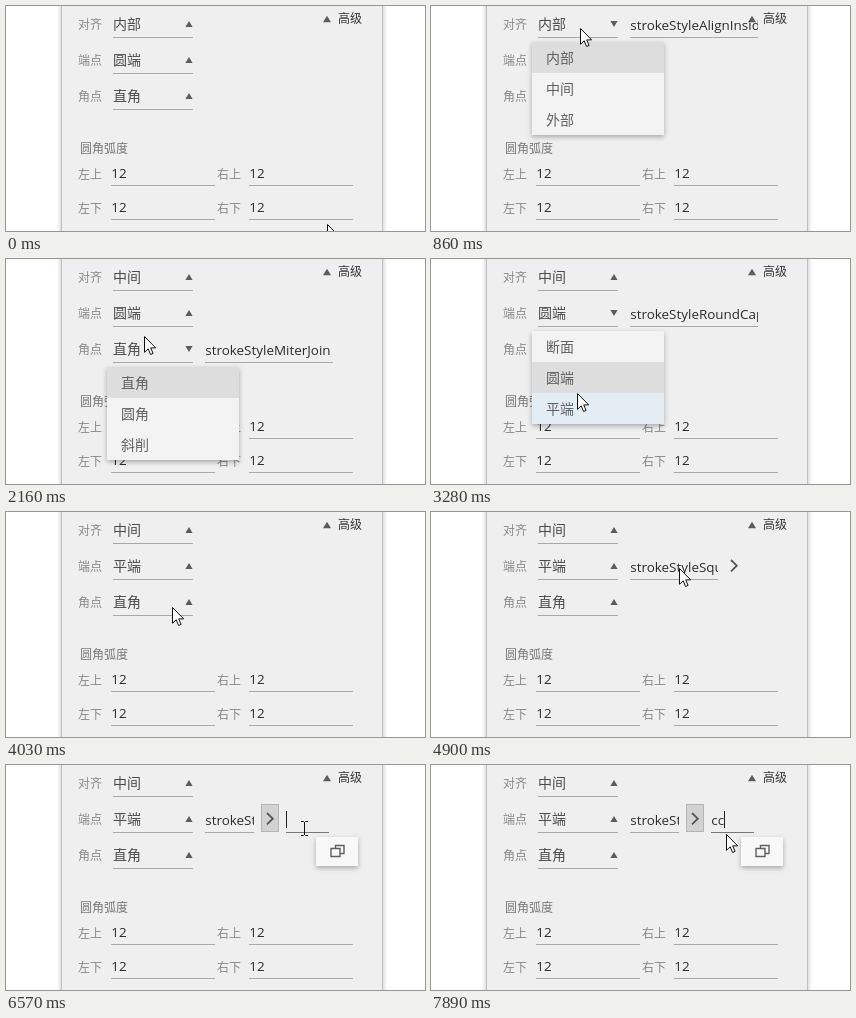
These frames come from a looping animation (419 by 225 pixels, 8 s). An HTML page:

```html
<!DOCTYPE html>
<html lang="zh-CN">
<head>
<meta charset="utf-8">
<title>描边设置</title>
<style>
  html, body { margin: 0; width: 100%; height: 100%; overflow: hidden; background: #fff; }
  svg { display: block; }
  text { font-family: "Open Sans", "Noto Sans CJK SC", "Noto Sans CJK", sans-serif; }
  .cjk { font-family: "Noto Sans CJK SC", "Noto Sans CJK", sans-serif; }
  .raised { filter: drop-shadow(0 2px 2.5px rgba(0, 0, 0, .3)); }
</style>
</head>
<body>
<svg id="stage" width="419" height="225" viewBox="0 0 419 225">
  <defs>
    <linearGradient id="edge"><stop stop-color="#000" stop-opacity=".12"/><stop offset="1" stop-color="#000" stop-opacity="0"/></linearGradient>
  </defs>
  <rect x="377" width="4" height="225" fill="url(#edge)"/>
  <rect x="377" width="4" height="225" fill="url(#edge)" transform="matrix(-1 0 0 1 432 0)"/>
  <rect x="55" width="322" height="225" fill="#efefef"/>
  <path d="M55.5 0V225M376.5 0V225" stroke="#bfbfbf"/>
  <g id="fixed"></g>
  <g id="live"></g>
</svg>
<script>
const LOOP = 8000, STEP = 110, ITEM = 31;

// value changes from `was` to `now` at `pick`; the menu shows during each `open` span
const rows = [
  { label: '对齐', items: ['内部', '中间', '外部'], was: 0, now: 1, pick: 1950, code: 'AlignInside', open: [[530, 1950]] },
  { label: '端点', items: ['断面', '圆端', '平端'], was: 1, now: 2, pick: 3910, code: 'RoundCap', open: [[2700, 3910], [4240, 4460]] },
  { label: '角点', items: ['直角', '圆角', '斜削'], was: 0, now: 0, pick: LOOP, code: 'MiterJoin', open: [[2050, 2595], [4130, 4240]] }
];
rows.forEach((r, i) => r.y = 18 + 36 * i);

// pointer moves: start, end, then where it stops
const moves = [
  [100, 650, 150, 16], [860, 1310, 138, 77], [2490, 2710, 146, 56], [2820, 3280, 146, 134],
  [3910, 4245, 185, 56], [4355, 4900, 248, 56], [5040, 5790, 300, 50], [5890, 6230, 298, 63],
  [7890, 7890, 295, 69]
];

const mix = (a, b, p) => a + (b - a) * p;

// eased progress from a to b, advancing once per STEP
function ease(t, a, b) {
  if (t < a) return 0;
  if (t >= b) return 1;
  const n = Math.round((b - a) / STEP);
  const p = (Math.floor((t - a) / (b - a) * n) + 1) / (n + 1);
  return p * p * (3 - 2 * p);
}

const pointerAt = t => moves.reduce(([x, y], [a, b, toX, toY]) => {
  const p = ease(t, a, b);
  return [mix(x, toX, p), mix(y, toY, p)];
}, [321, 218]);

const isOpen = (row, t) => row.open.some(([a, b]) => t >= a && t < b);
const chosen = (row, t) => t < row.pick ? row.was : row.now;

const cjk = (x, cy, s, size, fill) =>
  `<text class="cjk" x="${x}" y="${cy + size * .38}" font-size="${size}" fill="${fill}">${s}</text>`;
const latin = (x, y, s) => `<text x="${x}" y="${y}" font-size="13.45" fill="#2c2c2c">${s}</text>`;
const line = (x1, x2, y, color = '#a8a8a8') => `<path d="M${x1} ${y + .5}H${x2}" stroke="${color}"/>`;
const rect = (x, y, w, h, fill, extra = '') =>
  `<rect x="${x}" y="${y}" width="${w}" height="${h}" fill="${fill}" ${extra}/>`;
const stroke = (d, color, width = 1) =>
  `<path d="${d}" fill="none" stroke="${color}" stroke-width="${width}"/>`;
const tri = (cx, cy, r, dir = 1) =>
  `<path d="M${cx - r} ${cy + dir * r * .8}h${2 * r}l${-r} ${-dir * r * 1.6}z" fill="#5c5c5c"/>`;

function fixedParts() {
  let s = tri(321, 13, 4) + cjk(332, 12.5, '高级', 12, '#333') + cjk(74, 142, '圆角弧度', 12, '#777');
  for (const r of rows) s += cjk(72, r.y + .5, r.label, 12, '#888') + line(107, 187, r.y + 13);
  ['上', '下'].forEach((v, j) => ['左', '右'].forEach((h, i) => {
    const x = 105 + 138 * i, y = 167 + 34 * j;
    s += cjk(72 + 139 * i, y + 1, h + v, 12, '#888') + latin(x + .3, y + 5, '12') + line(x, x + 104, y + 12);
  }));
  return s;
}

function field(row, right, code) {
  return `<svg x="199" y="${row.y - 10}" width="${right - 199}" height="22">${latin(.3, 16, 'strokeStyle' + code)}</svg>`
    + line(199, right, row.y + 13);
}

function menu(row, t, [px, py]) {
  const top = row.y + 18;
  const hover = px > 101 && px < 233 ? Math.floor((py - top) / ITEM) : -1;
  const press = ease(t, row.pick - 750, row.pick - 640) * (row === rows[0])
    + ease(t, row.pick - 540, row.pick - 420) * (row === rows[1]);
  let s = rect(101, top, 132, 3 * ITEM, '#f3f3f3');
  row.items.forEach((item, i) => {
    const y = top + i * ITEM, picked = i === chosen(row, t), on = i === hover && !picked;
    if (picked || on) s += rect(101, y, 132, ITEM, picked ? '#ddd' : '#e5edf4');
    if (on) s += rect(101, y, 132, ITEM, '#48a4ff', `opacity="${press}"`);
    s += cjk(115, y + 15.5, item, 14, on && press > .4 ? '#fff' : '#606060');
  });
  return `<g class="raised">${s}</g>`;
}

// value chain on the second row: field, button, then a new field
function chain(row, t) {
  const shrink = ease(t, 4355, 4690), grow = ease(t, 5890, 6230);
  const right = 327 - 40 * shrink - 39 * grow, x = right + 7;
  let s = field(row, right, t < row.pick ? row.code : 'SquareCap');
  if (t > 5560) s += rect(x + .5, 39.5, 17, 27, '#d2d2d2', 'stroke="#b4b4b4"');
  if (shrink) s += stroke(`M${x + 6} 48l5.8 5.7-5.8 5.7`, '#555', 1.8);
  if (grow) {
    const typed = 'cc'.slice(0, Math.max(0, Math.floor((t - 6690) / 220)));
    s += latin(x + 25.3, 60, typed) + line(x + 25, x + 25 + 43 * grow, 67, '#777');
    s += rect(x + 25 + typed.length * 6.5, 46, 1, 17, '#222');
  }
  if (t > 5140) {
    const px = mix(274, 310, grow);
    s += `<g class="raised">${rect(px, 72, 42, 29, '#f8f8f8')}</g>`
      + stroke(`M${px + 19.5} 83v-2.5h8.5v8h-4M${px + 15} 83.5h9v8h-9z`, '#606060', 1.4);
  }
  return s;
}

function pointer(t, [x, y]) {
  const beam = t >= 6200 && t < 7890;
  const shape = beam
    ? stroke('M-3-6.5h2.5l1 1 1-1h2.5M.5-6v13M-3 7.5h2.5l1-1 1 1h2.5', '#111')
    : '<path d="M.5 .5V16.3L4.2 12.8 6.6 18.5 9.1 17.4 6.7 11.9H11.7Z" fill="#fff" stroke="#111"/>';
  return `<g transform="translate(${Math.round(x)} ${Math.round(y)})">${shape}</g>`;
}

function scene(t) {
  const pos = pointerAt(t);
  let s = '', top = '';
  for (const r of rows) {
    const open = isOpen(r, t);
    s += cjk(107, r.y, r.items[chosen(r, t)], 14, '#4c4c4c') + tri(183, r.y, 3.6, open ? -1 : 1);
    if (r === rows[1] && (open || t >= 4240)) s += chain(r, t);
    else if (open) s += field(r, 327, r.code);
    if (open) top += menu(r, t, pos);
  }
  return s + top + pointer(t, pos);
}

const live = document.getElementById('live');
document.getElementById('fixed').innerHTML = fixedParts();
const start = performance.now();
let shown = '';

function tick() {
  const next = scene((performance.now() - start) % LOOP);
  if (next !== shown) live.innerHTML = shown = next;
  requestAnimationFrame(tick);
}
tick();
</script>
</body>
</html>
```
